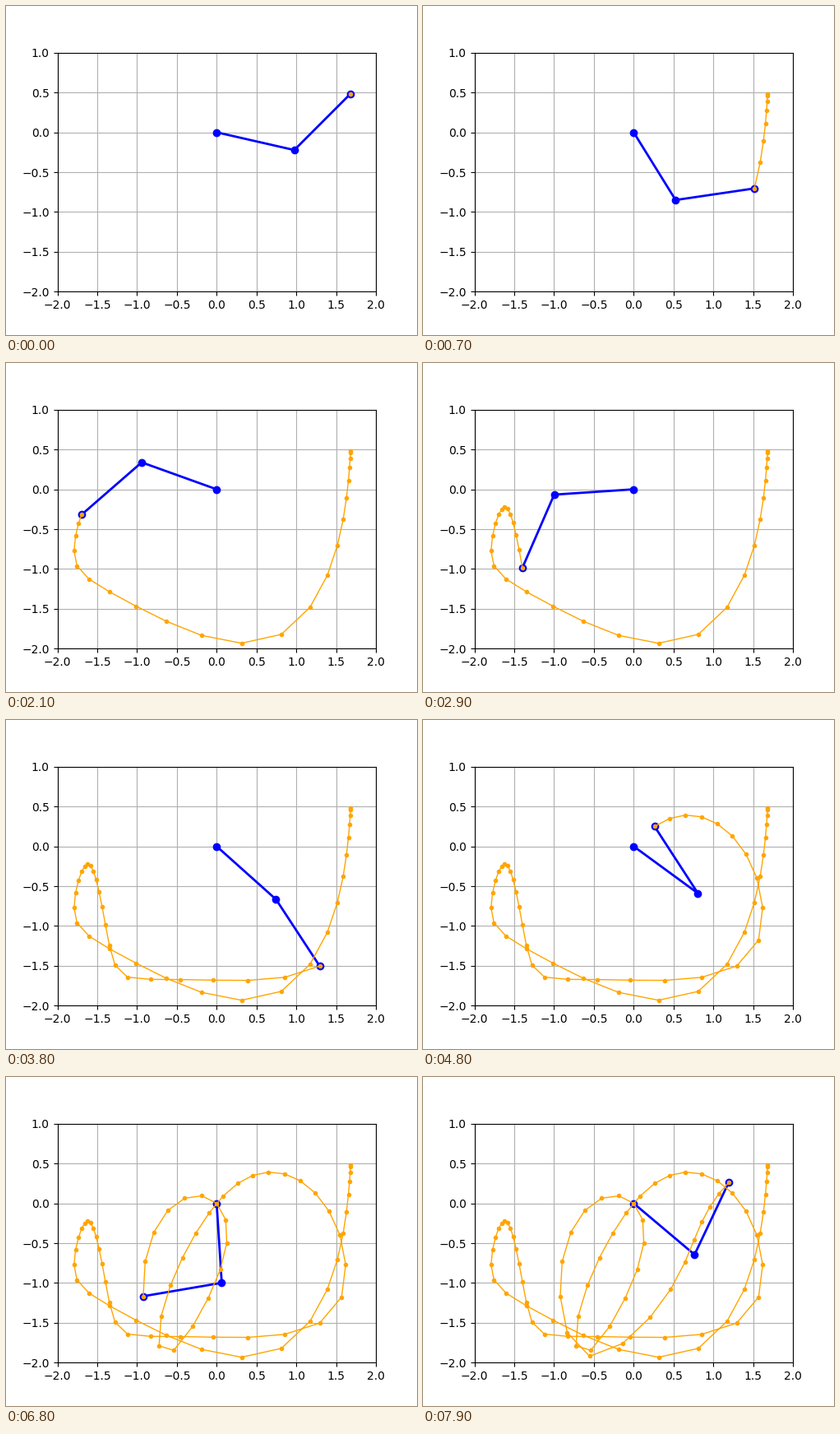
These frames come from a looping animation (500x400 px, 8 s). A matplotlib script:

```python
import numpy as np
import matplotlib.pyplot as plt
from matplotlib.animation import FuncAnimation

G = 9.81
FRAMES, INTERVAL = 80, 100
DT = 1 / 15        # simulated seconds per frame
SUBSTEPS = 40


def derivs(state):
    """Double pendulum with unit rods and unit masses."""
    a1, w1, a2, w2 = state
    c, s = np.cos(a1 - a2), np.sin(a1 - a2)
    den = 1 + s * s
    acc1 = (G * np.sin(a2) * c - s * (w1**2 * c + w2**2)
            - 2 * G * np.sin(a1)) / den
    acc2 = (2 * (w1**2 * s - G * np.sin(a2) + G * np.sin(a1) * c)
            + w2**2 * s * c) / den
    return np.array([w1, acc1, w2, acc2])


def rk4(state, h):
    k1 = derivs(state)
    k2 = derivs(state + h / 2 * k1)
    k3 = derivs(state + h / 2 * k2)
    k4 = derivs(state + h * k3)
    return state + h / 6 * (k1 + 2 * k2 + 2 * k3 + k4)


def simulate():
    state = np.array([3 * np.pi / 7, 0, 3 * np.pi / 4, 0])
    states = [state]
    for _ in range(FRAMES - 1):
        for _ in range(SUBSTEPS):
            state = rk4(state, DT / SUBSTEPS)
        states.append(state)
    return np.array(states)


a1, _, a2, _ = simulate().T
x1, y1 = np.sin(a1), -np.cos(a1)
x2, y2 = x1 + np.sin(a2), y1 - np.cos(a2)

fig = plt.figure(figsize=(5, 4), dpi=100)
ax = fig.add_subplot(autoscale_on=False, xlim=(-2, 2), ylim=(-2, 1))
ax.set_aspect("equal")
ax.grid()

rods, = ax.plot([], [], "o-", color="blue", lw=2)
trace, = ax.plot([], [], ".-", color="orange", lw=1)


def update(i):
    rods.set_data([0, x1[i], x2[i]], [0, y1[i], y2[i]])
    trace.set_data(x2[:i + 1], y2[:i + 1])
    return rods, trace


anim = FuncAnimation(fig, update, frames=FRAMES, interval=INTERVAL,
                     repeat=True, repeat_delay=0, blit=False)
plt.show()
```
